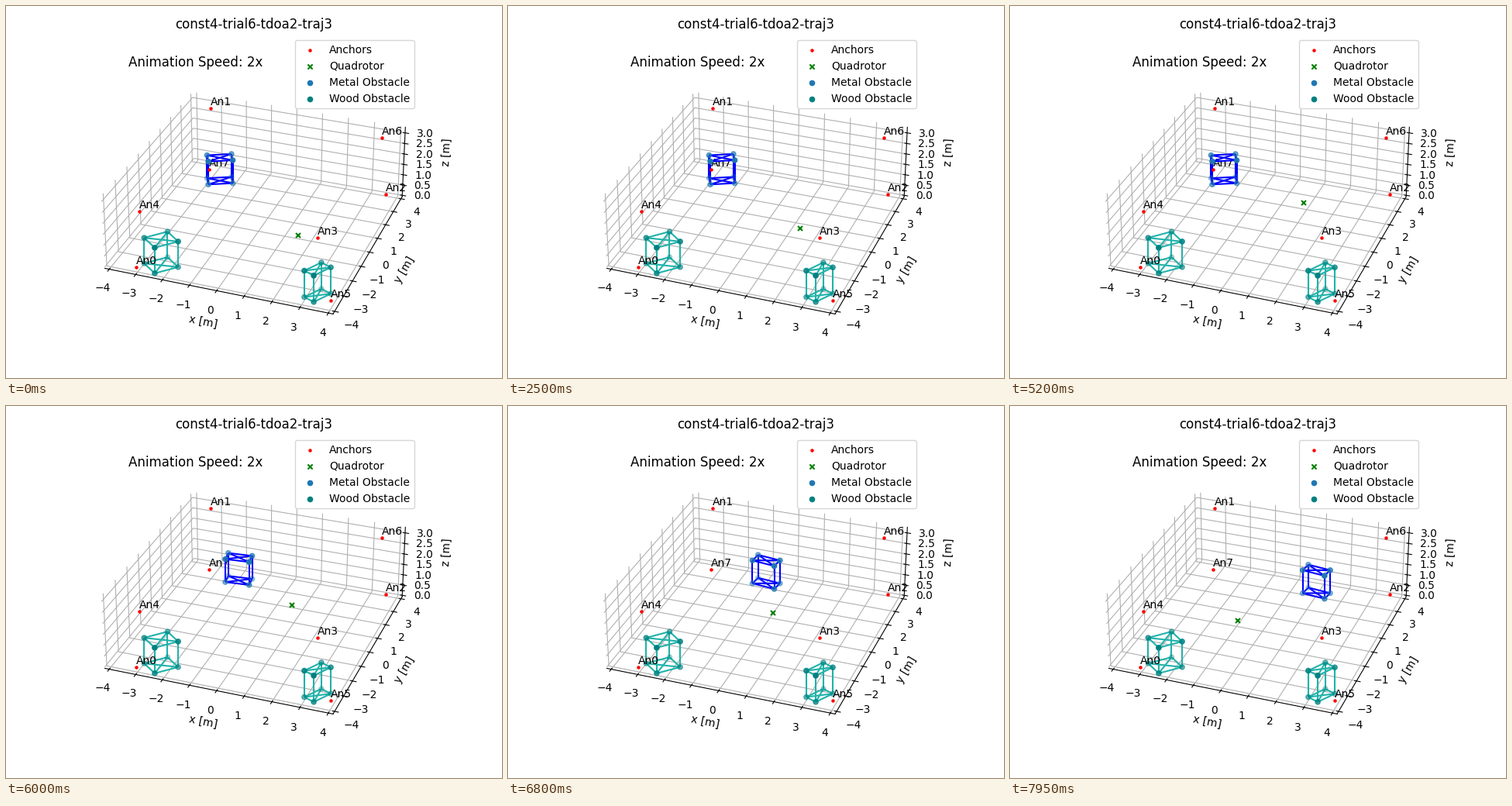
A matplotlib script that plays this animation: 640 px wide and 480 px high, repeating every 8000 ms.

```python
from itertools import combinations

import matplotlib.pyplot as plt
import numpy as np
from matplotlib.animation import FuncAnimation
from matplotlib.collections import LineCollection
from matplotlib.colors import to_rgba

W, H, DPI = 640, 480, 100
FRAMES, STEP = 160, 50
TILT = 0.5           # vertical foreshortening of the floor

ANCHORS = [(168, 337), (264, 132), (490, 243), (402, 299),
           (172, 265), (419, 380), (485, 170), (262, 211)]


def ease(t, start, end):
    """Half cosine from 0 to 1 between two times in seconds."""
    u = np.clip((t - start) / (end - start), 0, 1)
    return (1 - np.cos(np.pi * u)) / 2


def drone_at(t):
    """Fly away from the viewer, hover, then swing to the left."""
    x = 377 - 1.5 * ease(t, 1.2, 3.7) + 3.5 * ease(t, 4.3, 5.2) - 117 * ease(t, 5.2, 9.4)
    y = 296 - 40 * ease(t, 1.75, 4.05) - 2 * ease(t, 4.1, 5.2) + 23 * ease(t, 5.4, 8.1)
    return x, y


def metal_at(t):
    """Stand still, then get pushed to the right while turning."""
    s = max(t - 5.2, 0)
    return 276 + 25 * s + 6.7 * s * s, 195.8 - 2.95 * s + 3.2 * s * s, 6 - 33 * ease(t, 5.1, 6.7)


class Box:
    """Wire box with every lid and base corner joined, shaded by depth."""

    def __init__(self, ax, size, line, dot, zorder):
        self.long, self.short, height = size
        self.drop = np.array([0, height])
        self.dot = to_rgba(dot)
        self.wires = ax.add_collection(
            LineCollection([], colors=line, linewidths=1.5, zorder=zorder))
        self.dots = ax.scatter([], [], s=20, zorder=zorder)

    def place(self, x, y, heading):
        a = np.radians(heading)
        u = self.long * np.array([np.cos(a), -TILT * np.sin(a)])
        v = self.short * np.array([np.sin(a), TILT * np.cos(a)])
        lid = np.array([x, y]) + np.array([-u - v, u - v, u + v, v - u])
        base = lid + self.drop
        wires = [(p[i], p[j]) for p in (lid, base)
                 for i, j in combinations(range(4), 2)]
        self.wires.set_segments(wires + list(zip(lid, base)))
        floor = -1.8 * base[:, 1]
        depth = np.concatenate([floor - 0.55 * self.drop[1], floor])
        rgba = np.tile(self.dot, (8, 1))
        rgba[:, 3] = 1 - 0.7 * (depth - depth.min()) / np.ptp(depth)
        self.dots.set_offsets(np.concatenate([lid, base]))
        self.dots.set_facecolors(rgba)
        self.dots.set_edgecolors(rgba)


def draw_room(fig):
    ax = fig.add_subplot(projection="3d")
    ax.set_box_aspect((1, 1, 0.35))
    ax.view_init(elev=30, azim=-70)
    ax.set(xlim=(-25 / 6, 25 / 6), ylim=(-25 / 6, 25 / 6),
           zlim=(-0.2 / 3, 3.2 + 0.2 / 3),
           xlabel="x [m]", ylabel="y [m]", zlabel="z [m]",
           xticks=range(-4, 5), yticks=range(-4, 5), zticks=np.arange(0, 3.1, 0.5))
    for axis in (ax.xaxis, ax.yaxis, ax.zaxis):
        axis.set_pane_color((1, 1, 1, 0))
    ax.set_title("const4-trial6-tdoa2-traj3")
    for label, color, marker, size in (("Anchors", "red", "o", 5),
                                       ("Quadrotor", "green", "x", 20),
                                       ("Metal Obstacle", "tab:blue", "o", 20),
                                       ("Wood Obstacle", "teal", "o", 20)):
        ax.scatter([], [], [], s=size, color=color, marker=marker,
                   label=label, depthshade=False)
    ax.legend(loc="upper right")


fig = plt.figure(figsize=(W / DPI, H / DPI), dpi=DPI, facecolor="white")
draw_room(fig)
fig.tight_layout()
fig.text(158 / W, 1 - 77.5 / H, "Animation Speed: 2x", fontsize=12)

# Flat layer in screen pixels above the room.
ax = fig.add_axes([0, 0, 1, 1])
ax.set(xlim=(0, W), ylim=(H, 0))
ax.axis("off")

Box(ax, (17.1, 14.5, 33), "lightseagreen", "teal", 2).place(200.2, 301.5, 28)
Box(ax, (15.3, 8.8, 34), "lightseagreen", "teal", 2).place(402, 339.4, 44)
for i, (x, y) in enumerate(ANCHORS):
    ax.text(x, y - 0.6, f"An{i}", va="bottom", zorder=3)
metal = Box(ax, (15.8, 8.1, 29.6), "blue", "tab:blue", 4)
ax.scatter(*np.add(ANCHORS, 0.4).T, s=5, color="red", zorder=5)
drone, = ax.plot([], [], "x", color="green", ms=20 ** 0.5, mew=1.5, zorder=6)


def update(frame):
    t = frame * STEP / 1000
    metal.place(*metal_at(t))
    x, y = drone_at(t)
    drone.set_data([x + 0.4], [y + 0.4])
    return metal.wires, metal.dots, drone


anim = FuncAnimation(fig, update, frames=FRAMES, interval=STEP,
                     repeat=True, repeat_delay=0)
plt.show()
```
